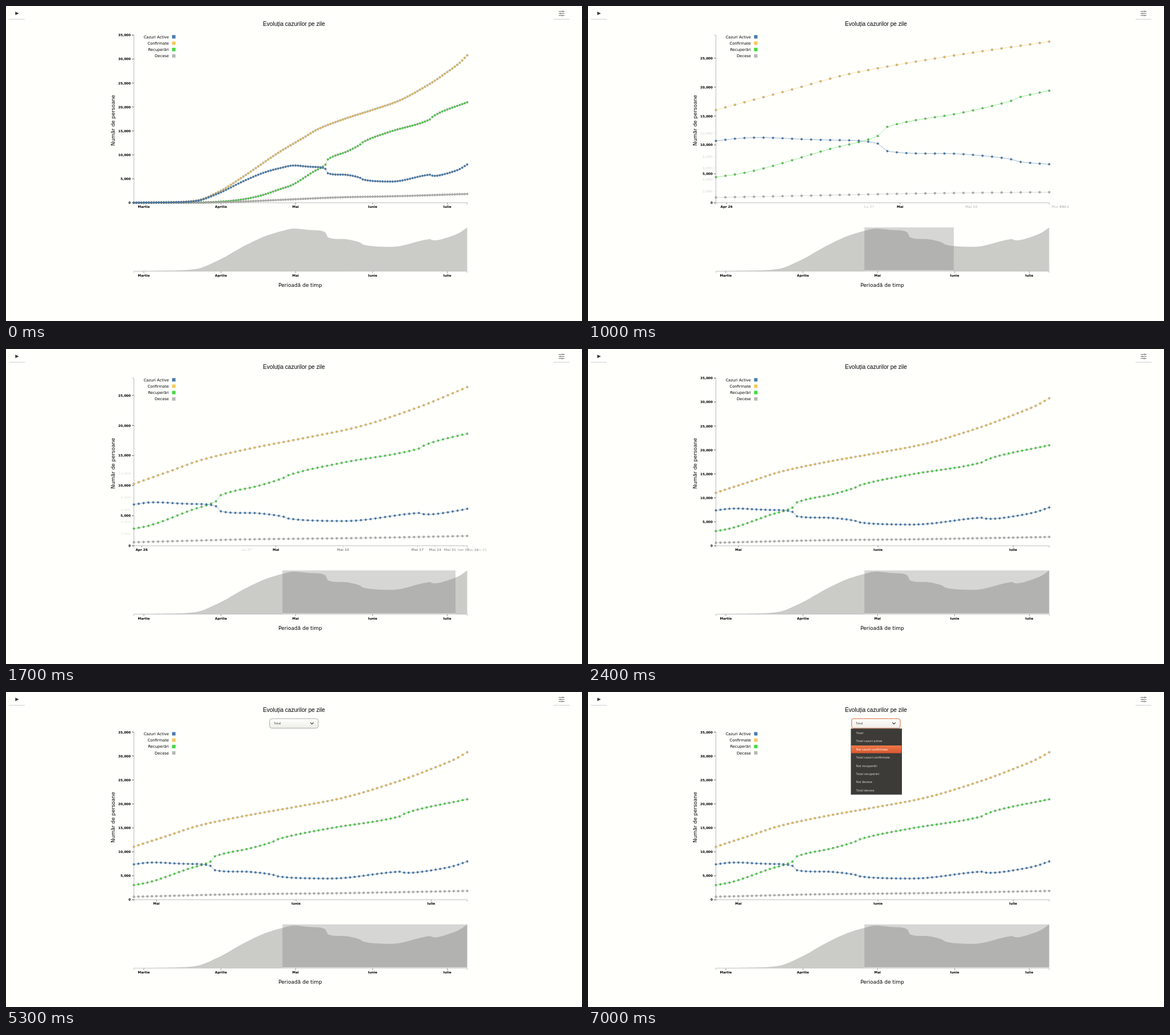
Animation of 1011 by 554 pixels, one loop 8000 ms. Source, as an HTML page with a canvas:

```html
<!DOCTYPE html>
<html lang="ro">
<head>
<meta charset="utf-8">
<title>Evoluția cazurilor</title>
<style>
html, body { margin: 0; width: 100%; height: 100%; overflow: hidden; background: #fffffc; }
canvas { display: block; width: 1011px; height: 554px; }
</style>
</head>
<body>
<canvas id="stage"></canvas>
<script>
const W = 1011, H = 554, LOOP = 8000;
const L = 224.5, R = 809.5, BASE = 346, TALL = 294.8;
const FIRST = 60, LAST = 134;
const BRUSH = 500, RELEASE = 1800, SETTLED = 2400, STEP = 100, PULL = .045;
const SANS = '"DejaVu Sans", sans-serif', UI = '"Noto Sans", sans-serif';
const AXIS_FONT = 'bold 5.7px ' + SANS;
const cv = document.getElementById('stage');
const c = cv.getContext('2d');
const dpr = window.devicePixelRatio || 1;
cv.width = W * dpr;
cv.height = H * dpr;

const mix = (a, b, k) => a + (b - a) * k;
const clamp = k => Math.min(1, Math.max(0, k));
const cubic = k => k < .5 ? 4 * k ** 3 : 1 - (2 - 2 * k) ** 3 / 2;

// monotone cubic curve through [day, value] points, sampled once a day
function curve(pts) {
  const n = pts.length - 1;
  const slope = i => (pts[i + 1][1] - pts[i][1]) / (pts[i + 1][0] - pts[i][0]);
  const tangent = i => {
    if (i === 0) return slope(0);
    if (i === n) return slope(n - 1);
    const a = slope(i - 1), b = slope(i);
    return a * b > 0 ? 2 * a * b / (a + b) : 0;
  };
  return Array.from({ length: LAST + 1 }, (_, d) => {
    let i = 0;
    while (i < n - 1 && d > pts[i + 1][0]) i++;
    const [x, y] = pts[i], [x2, y2] = pts[i + 1];
    const w = x2 - x, k = (d - x) / w, m = 1 - k;
    return y * (1 + 2 * k) * m * m + tangent(i) * w * k * m * m
      + y2 * k * k * (3 - 2 * k) - tangent(i + 1) * w * k * k * m;
  });
}

// day 0 is 26 February
const confirmed = curve([[0, 1], [18, 158], [25, 433], [34, 2245], [44, 5467], [58, 10417], [68, 13512],
  [74, 15362], [84, 17387], [96, 19398], [106, 21182], [119, 24826], [126, 27296], [131, 29223], [134, 30789]]);
const recovered = curve([[0, 0], [28, 86], [36, 267], [43, 647], [50, 1357], [60, 3054], [63, 3569],
  [72, 6423], [77, 7961], [78, 9053], [86, 10777], [91, 12162], [92, 12629], [103, 14830],
  [119, 17391], [120, 17907], [123, 18816], [134, 20969]]);
const deaths = curve([[0, 0], [25, 3], [35, 92], [64, 717], [84, 1147], [105, 1360], [134, 1834]]);
const active = confirmed.map((v, d) => v - recovered[d] - deaths[d]);

const BLUE = '#4a7bab', GOLD = '#f5c75c', GREEN = '#42da3f', GREY = '#b6b6b4';
const series = [[confirmed, GOLD], [recovered, GREEN], [deaths, GREY], [active, BLUE]];
const legend = [['Cazuri Active', BLUE], ['Confirmate', GOLD], ['Recuperări', GREEN], ['Decese', GREY]];
const months = [['Martie', 4], ['Aprilie', 35], ['Mai', 65], ['Iunie', 96], ['Iulie', 126]];
const menu = ['Total', 'Total cazuri active', 'Noi cazuri confirmate', 'Total cazuri confirmate',
  'Noi recuperări', 'Total recuperări', 'Noi decese', 'Total decese'];

// labels that drift while the range is dragged; goal is the opacity they tend to
const drifting = [
  { s: 'Apr 26', day: 60, x: 248, alpha: 1, goal: 1 },
  { s: 'Lu 27', day: 61, x: 555, alpha: .2, goal: 0 },
  { s: 'Mai', day: 65, x: 590, alpha: 1, goal: 1, stays: true },
  { s: 'Mai 10', day: 74, x: 673, alpha: 0, goal: 1 }
];
for (let day = 81; day < 120; day += 7) {
  const date = new Date(2020, 1, 26 + day);
  const s = (date.getMonth() === 4 ? 'Mai ' : 'Iun ') + String(date.getDate()).padStart(2, '0');
  drifting.push({ s, day, x: 845, alpha: .1, goal: 1, late: true });
}

const place = (d, from, to) => L + (d - from) / (to - from) * (R - L);

function brushEnd(t) {
  if (t >= RELEASE) return R;
  return t < 1000 ? mix(502, 642, (t - BRUSH) / 500) : mix(642, 789, (t - 1000) / 700);
}
const lastDay = t => Math.floor((brushEnd(t) - L) / (R - L) * LAST + .01);
function topValue(to) {
  const step = confirmed[to] / 8 < 3162 ? 2000 : 5000;
  return Math.ceil(confirmed[to] / step) * step;
}

// each drag step pulls a value a little towards its current target
function pulled(start, target, t, from = BRUSH) {
  let v = start;
  for (let s = from + STEP; s <= Math.min(t, 1700); s += STEP) v = mix(v, target(s), PULL);
  return v;
}
function enterTime(day) {
  let t = BRUSH;
  while (t < RELEASE && lastDay(t) < day) t += STEP;
  return t;
}

function text(s, x, y, font, align = 'center', color = '#000') {
  c.font = font;
  c.textAlign = align;
  c.fillStyle = color;
  c.fillText(s, x, y);
}
function line(color, width, ...pts) {
  c.strokeStyle = color;
  c.lineWidth = width;
  c.beginPath();
  for (let i = 0; i < pts.length; i += 2) c.lineTo(pts[i], pts[i + 1]);
  c.stroke();
}
function box(x, y, w, h, fill) {
  c.fillStyle = fill;
  c.fillRect(x, y, w, h);
}
function fade(y, h, top, bottom) {
  const g = c.createLinearGradient(0, y, 0, y + h);
  g.addColorStop(0, top);
  g.addColorStop(1, bottom);
  return g;
}

function xTick(s, x, y, alpha = 1) {
  c.globalAlpha = alpha;
  line('#666', .7, x, y, x, y + 3);
  text(s, x, y + 8.7, AXIS_FONT);
  c.globalAlpha = 1;
}
function yTick(v, gap, alpha = 1) {
  const y = BASE - v / 1000 * gap;
  c.globalAlpha = alpha;
  line('#444', .8, L - 3.5, y, L, y);
  text(v.toLocaleString('en-US'), 219, y + 2.1, AXIS_FONT, 'right');
  c.globalAlpha = 1;
}

function drawAxes(t) {
  line('#aaa', .8, L - 3.5, BASE - TALL, L, BASE - TALL, L, BASE, L - 3.5, BASE);
  line('#aaa', .8, L, BASE + 3.5, L, BASE, R, BASE, R, BASE + 3.5);
  const moving = t >= BRUSH && t < SETTLED;
  const settle = cubic(clamp((t - RELEASE) / (SETTLED - RELEASE)));
  const rest = TALL / 35;
  const gap = moving ? mix(pulled(rest, s => TALL * 1000 / topValue(lastDay(s)), t), rest, settle) : rest;
  for (let v = 0; v <= 35000; v += 5000) yTick(v, gap);
  if (!moving) {
    const from = t < BRUSH ? 0 : FIRST;
    for (const [s, d] of months) if (d >= from) xTick(s, place(d, from, LAST), BASE);
    return;
  }
  const dim = pulled(.14, () => 0, t) * (1 - settle);
  for (let v = 2000; v <= 12000; v += 2000) if (v % 5000) yTick(v, gap, dim);
  for (const { s, day, x, alpha, goal, late, stays } of drifting) {
    const from = late ? enterTime(day) : BRUSH;
    if (t < from) continue;
    const at = pulled(x, u => place(day, FIRST, lastDay(u)), t, from);
    const shown = pulled(alpha, () => goal, t, from) * (stays ? 1 : 1 - settle);
    xTick(s, mix(at, place(day, FIRST, LAST), settle), BASE, shown);
  }
  for (const [s, d] of months.slice(3)) xTick(s, place(d, FIRST, mix(129, LAST, settle)), BASE, settle);
}

function drawSeries(from, to) {
  const top = topValue(to);
  for (const [data, color] of series) {
    const pts = [];
    for (let d = from; d <= to; d++) pts.push([place(d, from, to), BASE - data[d] / top * TALL]);
    c.globalAlpha = .6;
    line(color, .9, ...pts.flat());
    c.globalAlpha = 1;
    c.fillStyle = color;
    c.strokeStyle = color === BLUE ? '#43627f' : '#74746c';
    c.lineWidth = .55;
    for (const [x, y] of pts) {
      c.beginPath();
      c.arc(x, y, 1.7, 0, 7);
      c.fill();
      c.stroke();
    }
  }
}

function drawOverview(end) {
  const floor = 466;
  c.fillStyle = '#cbccc8';
  c.beginPath();
  c.moveTo(L, floor);
  active.forEach((v, d) => c.lineTo(place(d, 0, LAST), floor - v / active[LAST] * 76.6));
  c.lineTo(R, floor);
  c.fill();
  line('#b4b4b2', .8, L, floor + 3.5, L, floor + .4, R, floor + .4, R, floor + 3.5);
  for (const [s, d] of months) xTick(s, place(d, 0, LAST), floor + .8);
  if (end) {
    box(485.2, 389.4, end - 485.2, 75.8, 'rgba(119,119,119,.3)');
    line('#f4f4f1', .7, 485.2, 465.4, end, 465.4);
  }
}

function drawChart(t) {
  const brushed = t >= BRUSH;
  c.save();
  c.beginPath();
  c.rect(150, 46, 694, 460);
  c.clip();
  drawAxes(t);
  drawSeries(brushed ? FIRST : 0, brushed ? lastDay(t) : LAST);
  legend.forEach(([s, color], i) => {
    const y = 54.2 + i * 11.2;
    text(s, 286, y + 2.5, '6.75px ' + SANS, 'right');
    box(291.5, y - 3, 6, 6, color);
  });
  drawOverview(brushed ? brushEnd(t) : 0);
  text('Perioadă de timp', 516.5, 493.7, '9px ' + SANS);
  c.translate(191, 201);
  c.rotate(-Math.PI / 2);
  text('Număr de persoane', 0, 0, '9px ' + SANS);
  c.restore();
}

function drawButtons(hover) {
  if (hover) box(961, 3.5, 28, 19.5, '#f0f0ee');
  line('#ccc', 1, 5, 23.3, 33, 23.3);
  line('#ccc', 1, 961, 23.3, 989, 23.3);
  c.fillStyle = '#333';
  c.beginPath();
  c.moveTo(16.3, 10);
  c.lineTo(22.6, 13);
  c.lineTo(16.3, 16);
  c.fill();
  [977, 973, 976].forEach((knob, i) => {
    const y = 9.5 + i * 3.6;
    line('#444', .8, 970, y, knob - 1, y);
    line('#444', .8, knob, y, 980.3, y);
    line('#444', .8, knob, y - 1.5, knob, y + 1.5);
  });
}

function drawSelect(t) {
  const open = t >= 5600;
  c.beginPath();
  c.roundRect(462.7, 46.9, 85.3, 16.8, 4);
  c.fillStyle = fade(47, 17, '#fefefc', t < 5300 ? '#e7e7e2' : '#edede8');
  c.fill();
  c.strokeStyle = open ? '#dc8863' : '#a3a39d';
  c.lineWidth = open ? 1.3 : .9;
  c.stroke();
  text('Total', 470, 57.3, '5.5px ' + UI, 'left', '#444');
  line('#333', 1.1, 534.2, 53.6, 537, 56.4, 539.8, 53.6);
  if (!open) return;
  box(461.4, 64.3, 89.6, 116.2, '#3c3b37');
  const pick = [5800, 6600, 7000].filter(at => t >= at).length - 1;
  menu.forEach((s, i) => {
    const y = 72.1 + i * 14.36;
    if (i === pick) box(462, y - 6.8, 88.4, 13.6, fade(y - 6.8, 13.6, '#ee7849', '#d9582f'));
    text(s, 470.6, y + 2, '5.5px ' + UI, 'left', i === pick ? '#fff' : '#dfdbd2');
  });
}

function drawStatus(alpha) {
  c.globalAlpha = alpha;
  c.beginPath();
  c.roundRect(-5, 537, 309, 25, 3);
  c.fillStyle = '#ebebe8';
  c.fill();
  c.strokeStyle = '#c2c2be';
  c.lineWidth = 1;
  c.stroke();
  text('https://mirvadelo.example/curbe-20-ro-cases-by-date/#', 2, 550.4, '11.4px ' + UI, 'left', '#484848');
  c.globalAlpha = 1;
}

function draw(time) {
  const t = Math.floor(time / STEP) * STEP;
  const hover = t >= 4100 && t < 4500, opened = t >= 4300;
  c.setTransform(dpr, 0, 0, dpr, 0, 0);
  box(0, 0, W, H, '#fffffc');
  drawButtons(hover);
  text('Evoluția cazurilor pe zile', 505.5, 34.6, '10.1px "Liberation Sans", Arial, sans-serif');
  c.save();
  if (opened) c.translate(0, 19.3);
  drawChart(t);
  c.restore();
  if (opened) drawSelect(t);
  if (hover) drawStatus(t < 4400 ? 1 : .5);
}

function tick() {
  draw(performance.now() % LOOP);
  requestAnimationFrame(tick);
}
tick();
</script>
</body>
</html>
```
